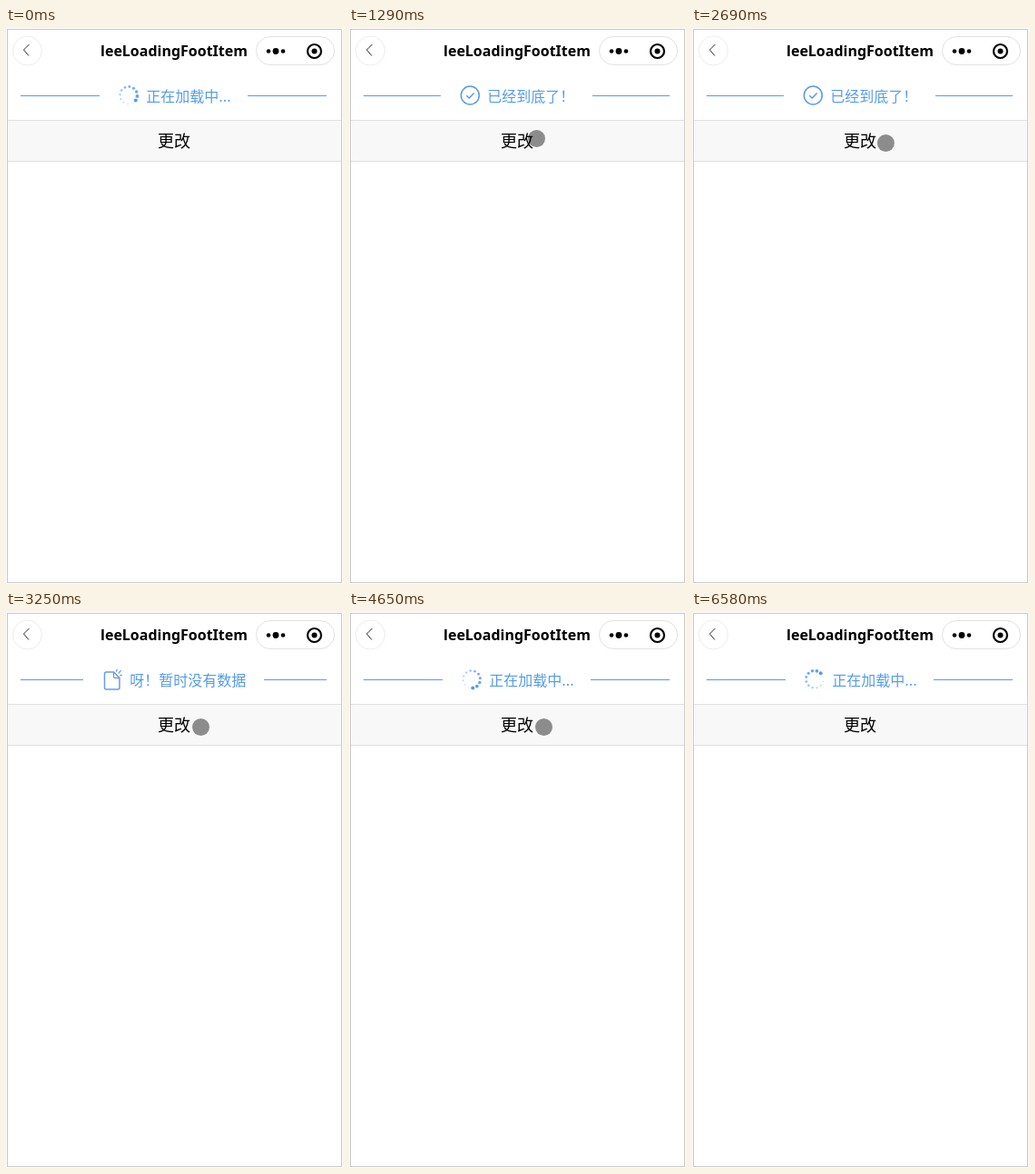
Write an HTML page with a canvas that moves like this. It is 371 by 611 pixels and loops after 6.66 s.

```html
<!DOCTYPE html>
<html lang="zh-CN">
<head>
<meta charset="utf-8">
<title>leeLoadingFootItem</title>
<style>
html, body { margin: 0; width: 100%; height: 100%; overflow: hidden; background: #fff; }
canvas { display: block; width: 371px; height: 611px; }
</style>
</head>
<body>
<canvas id="stage"></canvas>
<script>
const W = 371, H = 611, LOOP = 6660, TAU = Math.PI * 2;
const TICK = 77.5, FIRST_TICK = 67.5;
const BLUE = '#559ceb';
const CJK = '"Noto Sans CJK TC", "Noto Sans CJK SC", sans-serif';
const canvas = document.getElementById('stage');
const ctx = canvas.getContext('2d');
const dpr = window.devicePixelRatio || 1;
canvas.width = W * dpr;
canvas.height = H * dpr;

// The button is held for HOLD ms before each tap, which moves to the next state
const TAPS = [1285, 2470, 3165, 4110], HOLD = 100;
const loading = { label: '正在加载中...', icon: spinner };
const done = { label: '已经到底了！', icon: check };
const empty = { label: '呀！暂时没有数据', icon: emptyPage };
const STATES = [loading, done, done, empty, loading];

const MOVES = [
  { from: 67, to: 1200, x: 206.5, y: 121.5 },
  { from: 1300, to: 1840, x: 211.5, y: 126.5 },
  { from: 2600, to: 2690, x: 214.5, y: 126.5 },
  { from: 4718, to: 5028, x: 257, y: 485 },
  { from: 5028, to: 5337, x: 219.5, y: 362.5 },
  { from: 5337, to: 5570, x: 240, y: 26 },
  { from: 5570, to: 5960, x: 361, y: 597 }
];

const snap = t => FIRST_TICK + Math.floor((t - FIRST_TICK) / TICK) * TICK;
const easeOut = k => 1 - (1 - k) ** 3;

function text(str, x, y, font, color, align = 'left') {
  ctx.font = font;
  ctx.fillStyle = color;
  ctx.textAlign = align;
  ctx.fillText(str, x, y);
}

function dot(x, y, r, color) {
  ctx.fillStyle = color;
  ctx.beginPath();
  ctx.arc(x, y, r, 0, TAU);
  ctx.fill();
}

function stroke(path, width, color) {
  ctx.strokeStyle = color;
  ctx.lineWidth = width;
  ctx.stroke(new Path2D(path));
}

function ring(x, y, r, width, color) {
  const path = new Path2D();
  path.arc(x, y, r, 0, TAU);
  stroke(path, width, color);
}

function header() {
  ring(23.5, 25, 16, 1, '#ededed');
  stroke('M25.5 18 L19.5 24 L25 30.5', 1, '#3a2626');
  text('leeLoadingFootItem', 185, 31, 'bold 16px "Noto Sans", "Open Sans", sans-serif', '#000', 'center');
  const capsule = new Path2D();
  capsule.roundRect(275.5, 9.5, 86, 31, 15.5);
  stroke(capsule, 1, '#e2e2e2');
  for (const i of [-1, 0, 1]) dot(297 + i * 8, 25.5, i ? 2.3 : 3.4, '#000');
  ring(339.5, 25.5, 7.5, 2.2, '#000');
  dot(339.5, 25.5, 3, '#000');
}

// Icons are drawn around the origin
function spinner(s) {
  const since = s < TAPS[0] ? -150 : TAPS[3];
  const head = (18.6 + (s - since) * 0.12) / 360 * TAU;
  for (let i = 0; i < 12; i++) {
    const a = head - i / 12 * TAU;
    const k = 1 - i / 11;
    ctx.globalAlpha = 0.35 + 0.65 * k;
    dot(9.5 * Math.cos(a), 9.5 * Math.sin(a), 0.6 + 1.4 * k, BLUE);
  }
  ctx.globalAlpha = 1;
}

function check() {
  ring(0.3, 0, 10, 1.5, BLUE);
  stroke('M-3.7 0.2 L-0.7 3 L4.6 -2.6', 1.5, BLUE);
}

function emptyPage() {
  const color = '#6a9cec';
  stroke('M1.5 -8 H-6.5 Q-8.5 -8 -8.5 -6 V9 Q-8.5 11 -6.5 11 H6 Q8 11 8 9 V-1.5 Z', 1.5, color);
  stroke('M1.5 -8 V-3 Q1.5 -1.5 3 -1.5 H8', 1.3, color);
  stroke('M4.3 -8.2 l1 -3 M6.8 -6.5 l2.8 -3.3 M8.3 -4.2 l2.7 -0.8', 1.2, color);
}

// A centred icon and label, with a rule filling the space on either side
function footer({ label, icon }, s) {
  const font = '350 16px ' + CJK;
  ctx.font = font;
  const left = Math.ceil(148.9 - ctx.measureText(label).width / 2);
  ctx.fillStyle = BLUE;
  ctx.fillRect(16, 74, left - 16, 1);
  ctx.fillRect(369 - left, 74, left - 16, 1);
  text(label, left + 51.3, 81, font, BLUE);
  ctx.save();
  ctx.translate(left + 32, 74);
  icon(s);
  ctx.restore();
}

function button(pressed) {
  ctx.fillStyle = pressed ? '#cacaca' : '#e0e0e0';
  ctx.fillRect(2, 101, 368, 46);
  ctx.fillStyle = pressed ? '#dedede' : '#f8f8f8';
  ctx.fillRect(2, 102, 368, 44);
  text('更改', 185, 131, '350 18px ' + CJK, pressed ? '#575757' : '#000', 'center');
}

function pointer(s) {
  if (s < MOVES[0].from || s > 6000) return;
  let x = 313, y = 588;
  for (const m of MOVES) {
    if (s < m.from) break;
    const k = easeOut(Math.min(1, (s - m.from) / (m.to - m.from)));
    x += (m.x - x) * k;
    y += (m.y - y) * k;
  }
  dot(x, y, 9.5, 'rgba(0,0,0,0.435)');
}

function draw(t) {
  const s = snap(t);
  ctx.setTransform(dpr, 0, 0, dpr, 0, 0);
  ctx.fillStyle = '#fff';
  ctx.fillRect(0, 0, W, H);
  header();
  footer(STATES[TAPS.filter(tap => t >= tap).length], s);
  button(TAPS.some(tap => t >= tap - HOLD && t < tap));
  ctx.strokeStyle = '#c8c8c8';
  ctx.lineWidth = 1;
  ctx.strokeRect(1.5, 1.5, 368, 608);
  pointer(s);
}

const start = performance.now();
function loop() {
  draw((performance.now() - start) % LOOP);
  requestAnimationFrame(loop);
}
loop();
</script>
</body>
</html>
```
